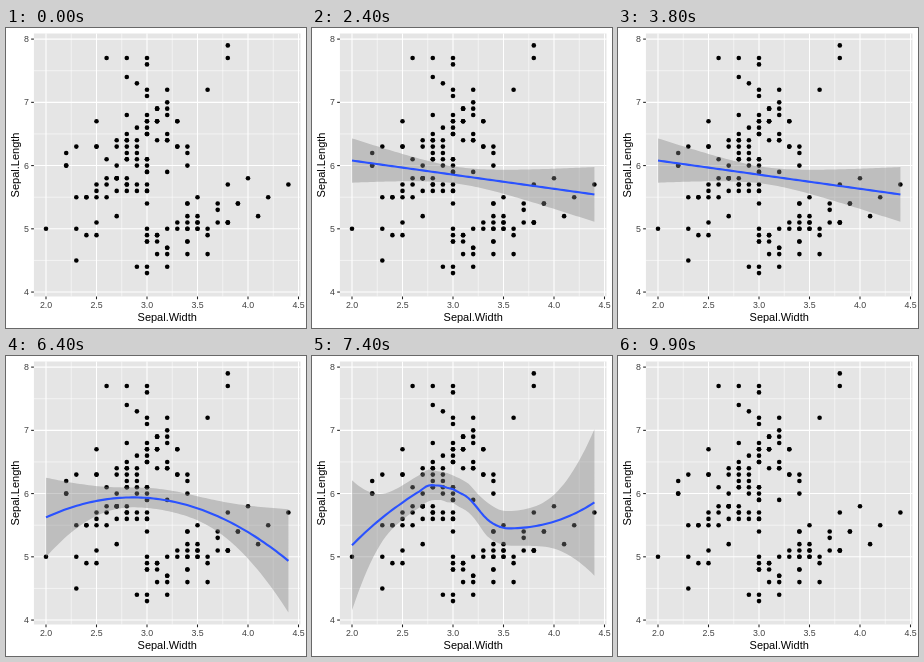
Write an HTML page with a canvas that moves like this. It is 300 px wide and 300 px high and loops after 10000 ms.

```html
<!DOCTYPE html>
<html lang="en">
<head>
<meta charset="utf-8">
<title>Scatter plot with three smooths</title>
<style>
  html, body { margin: 0; width: 100%; height: 100%; overflow: hidden; background: #fff; }
  canvas { display: block; width: 300px; height: 300px; }
</style>
</head>
<body>
<canvas id="plot"></canvas>
<script>
const SIZE = 300, LOOP = 10000;
const FONT = '"Liberation Sans", Arial, sans-serif';
const BOX = { l: 27.9, r: 294.5, t: 5.5, b: 268.5 };
const px = w => 40 + 101 * (w - 2);
const py = v => 11.1 + 63.24 * (8 - v);

// Sepal lengths in tenths, one row per sepal width in steps of 0.1
const narrow = [ // from width 2.0
  [50], [], [60, 60, 62], [45, 50, 55, 63], [49, 55, 55],
  [49, 51, 55, 56, 57, 63, 63, 67], [55, 57, 58, 61, 77],
  [52, 56, 58, 58, 58, 58, 60, 63, 64],
  [56, 57, 57, 58, 61, 61, 62, 63, 64, 64, 65, 68, 74, 77],
  [44, 56, 57, 60, 61, 62, 63, 64, 66, 73]
];
const wide = [ // from width 3.0
  [43, 44, 48, 48, 49, 50, 54, 56, 56, 57, 59, 59, 60, 61, 61, 65, 65, 65, 66, 67, 67, 68, 71, 72, 76, 77],
  [46, 48, 49, 49, 64, 67, 67, 67, 69, 69, 69],
  [44, 46, 47, 47, 50, 59, 64, 64, 65, 68, 69, 70, 72],
  [50, 51, 63, 63, 67, 67],
  [46, 48, 48, 50, 50, 51, 52, 54, 54, 60, 62, 63],
  [50, 50, 51, 51, 52, 55], [46, 49, 50, 72], [51, 53, 54],
  [51, 51, 51, 57, 77, 79], [54, 54], [58], [52], [55], [], [57]
];
const pts = [];
const addRows = (rows, start) => rows.forEach((row, i) =>
  row.forEach(v => pts.push({ x: (start + i) / 10, y: v / 10 })));
addRows(narrow, 20);
addRows(wide, 30);

// Solve M a = unit vector k by Gauss-Jordan elimination
function solveUnit(M, k) {
  const n = M.length;
  const A = M.map((row, i) => [...row, i === k ? 1 : 0]);
  for (let c = 0; c < n; c++) {
    for (let r = 0; r < n; r++) {
      if (r === c) continue;
      const f = A[r][c] / A[c][c];
      for (let j = c; j <= n; j++) A[r][j] -= f * A[c][j];
    }
  }
  return A.map((row, i) => row[n] / row[i]);
}

// Weights that turn the data into the k-th coefficient of a polynomial around x0
function coefWeights(x0, degree, weights, k) {
  const basis = pts.map(p => Array.from({ length: degree + 1 }, (_, j) => (p.x - x0) ** j));
  const M = basis[0].map((_, a) => basis[0].map((_, b) =>
    basis.reduce((s, row, i) => s + weights[i] * row[a] * row[b], 0)));
  const coef = solveUnit(M, k);
  return basis.map((row, i) => weights[i] * row.reduce((s, v, j) => s + v * coef[j], 0));
}

const even = pts.map(() => 1);
const polynomial = degree => x => coefWeights(x, degree, even, 0);

// Local quadratic regression, blended between knots with cubic Hermite pieces
function local() {
  const near = Math.floor(pts.length * 0.75);
  const knots = [1.988, 2.45, 2.65, 2.75, 2.85, 2.95, 3, 3.05, 3.15, 3.35, 3.55, 4.412].map(x => {
    const dist = pts.map(p => Math.abs(p.x - x));
    const h = [...dist].sort((a, b) => a - b)[near - 1];
    const w = dist.map(d => d < h * 0.999 ? (1 - (d / h) ** 3) ** 3 : 0);
    return { x, val: coefWeights(x, 2, w, 0), slope: coefWeights(x, 2, w, 1) };
  });
  return x => {
    let i = 0;
    while (i < knots.length - 2 && x > knots[i + 1].x) i++;
    const a = knots[i], b = knots[i + 1], d = b.x - a.x;
    const t = (x - a.x) / d, s = 1 - t;
    return pts.map((_, j) =>
      s * s * (1 + 2 * t) * a.val[j] + t * t * (3 - 2 * t) * b.val[j] +
      d * (t * s * s * a.slope[j] - t * t * s * b.slope[j]));
  };
}

// Fitted curve with its 95% band
function smooth(rowAt) {
  const fit = row => row.reduce((s, w, i) => s + w * pts[i].y, 0);
  let rss = 0, delta = 0, row, last;
  pts.forEach((p, i) => {
    if (p.x !== last) row = rowAt(last = p.x);
    rss += (p.y - fit(row)) ** 2;
    row.forEach((w, j) => { delta += ((i === j ? 1 : 0) - w) ** 2; });
  });
  const scale = 1.976 * Math.sqrt(rss / delta);
  return Array.from({ length: 80 }, (_, i) => {
    const x = 2 + 2.4 * i / 79, r = rowAt(x), y = fit(r);
    const e = scale * Math.hypot(...r);
    return { x: px(x), y: py(y), lo: py(y - e), hi: py(y + e) };
  });
}

const scenes = [
  { until: 2400, curve: null },
  { until: 4900, curve: smooth(polynomial(1)) },
  { until: 7400, curve: smooth(polynomial(2)) },
  { until: 9900, curve: smooth(local()) },
  { until: LOOP, curve: null }
];

const canvas = document.getElementById('plot');
const ctx = canvas.getContext('2d');
const ratio = window.devicePixelRatio || 1;
canvas.width = canvas.height = Math.round(SIZE * ratio);
ctx.scale(ratio, ratio);

function line(x1, y1, x2, y2, color, width) {
  ctx.strokeStyle = color;
  ctx.lineWidth = width;
  ctx.beginPath();
  ctx.moveTo(x1, y1);
  ctx.lineTo(x2, y2);
  ctx.stroke();
}
const vline = (w, width) => line(px(w), BOX.t, px(w), BOX.b, '#fff', width);
const hline = (v, width) => line(BOX.l, py(v), BOX.r, py(v), '#fff', width);

function text(str, x, y, size, color, align) {
  ctx.font = size + 'px ' + FONT;
  ctx.fillStyle = color;
  ctx.textAlign = align;
  ctx.fillText(str, x, y);
}

function drawAxes() {
  ctx.fillStyle = '#e5e5e5';
  ctx.fillRect(BOX.l, BOX.t, BOX.r - BOX.l, BOX.b - BOX.t);
  for (let w = 2.25; w < 4.5; w += 0.5) vline(w, 0.53);
  for (let v = 4.5; v < 8; v++) hline(v, 0.53);
  for (let w = 2; w <= 4.5; w += 0.5) {
    vline(w, 1.07);
    line(px(w), BOX.b, px(w), BOX.b + 2.74, '#222', 1.07);
    text(w.toFixed(1), px(w), 280, 8.8, '#404040', 'center');
  }
  for (let v = 4; v <= 8; v++) {
    hline(v, 1.07);
    line(BOX.l - 2.74, py(v), BOX.l, py(v), '#222', 1.07);
    text(String(v), 23, py(v) + 3.15, 8.8, '#404040', 'right');
  }
  text('Sepal.Width', (BOX.l + BOX.r) / 2, 293, 11, '#000', 'center');
  ctx.save();
  ctx.translate(13.4, (BOX.t + BOX.b) / 2);
  ctx.rotate(-Math.PI / 2);
  text('Sepal.Length', 0, 0, 11, '#000', 'center');
  ctx.restore();
}

function drawPoints() {
  ctx.fillStyle = '#000';
  for (const p of pts) {
    ctx.beginPath();
    ctx.arc(px(p.x), py(p.y), 2.3, 0, Math.PI * 2);
    ctx.fill();
  }
}

function drawCurve(curve) {
  ctx.beginPath();
  curve.forEach(c => ctx.lineTo(c.x, c.hi));
  [...curve].reverse().forEach(c => ctx.lineTo(c.x, c.lo));
  ctx.fillStyle = 'rgba(130, 130, 130, 0.4)';
  ctx.fill();
  ctx.beginPath();
  curve.forEach(c => ctx.lineTo(c.x, c.y));
  ctx.strokeStyle = '#2a52ff';
  ctx.lineWidth = 2.13;
  ctx.lineJoin = 'round';
  ctx.stroke();
}

function draw(time) {
  const { curve } = scenes.find(s => time < s.until);
  ctx.fillStyle = '#fff';
  ctx.fillRect(0, 0, SIZE, SIZE);
  drawAxes();
  drawPoints();
  if (curve) drawCurve(curve);
}

const start = performance.now();
function tick() {
  draw((performance.now() - start) % LOOP);
  requestAnimationFrame(tick);
}
tick();
</script>
</body>
</html>
```
